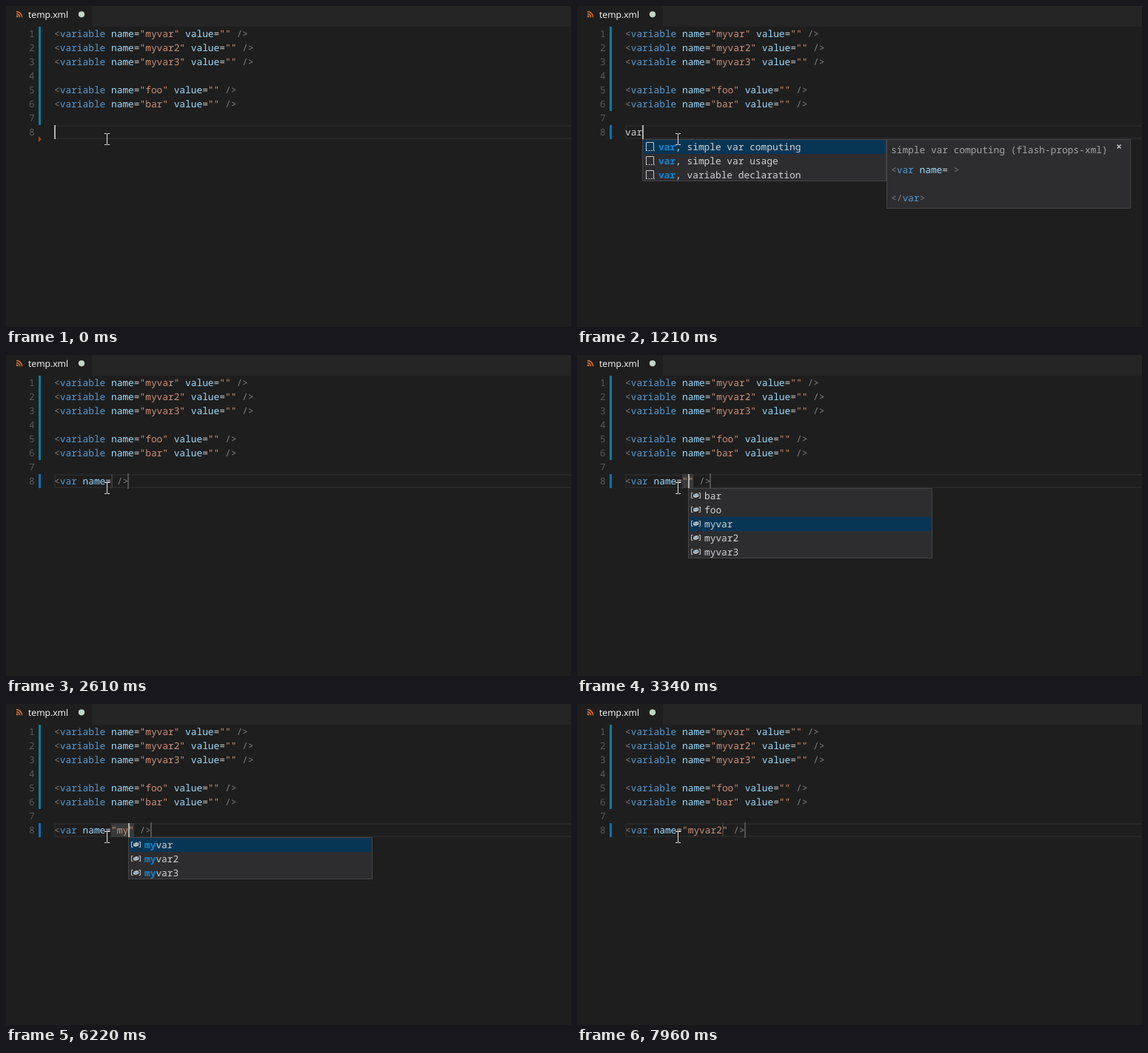
Animation of 763x434 px, one loop 8 s. Source, as an HTML page:

```html
<!DOCTYPE html>
<html lang="en">
<head>
<meta charset="utf-8">
<title>XML snippets</title>
<style>
  html, body { margin: 0; width: 100%; height: 100%; overflow: hidden; background: #1e1e1e; }
  svg { display: block; width: 763px; height: 434px; }
  text {
    font: 12.83px "Noto Sans Mono", "DejaVu Sans Mono", monospace;
    fill: #d4d4d4;
    white-space: pre;
    text-rendering: geometricPrecision;
  }
  .tab { font: 12.2px "Open Sans", "Noto Sans", sans-serif; fill: #fff; }
  .num { fill: #5a5a5a; }
  .punct { fill: #808080; }
  .tag { fill: #569cd6; }
  .attr { fill: #9cdcfe; }
  .str { fill: #ce9178; }
  .hit { fill: #0e85d4; font-weight: 700; }
  .note { fill: #a4a4a4; }
  .panel { fill: #2d2d30; stroke: #454545; }
  .line { fill: none; stroke: #c5c5c5; }
</style>
</head>
<body>
<svg viewBox="0 0 763 434">
  <rect width="763" height="434" fill="#1e1e1e"/>
  <rect x="116" width="647" height="28" fill="#252526"/>
  <g fill="none" stroke="#cc6d33" stroke-width="1.7">
    <path d="M14 10.6a4.6 4.6 0 0 1 4.6 4.6M14 7.6a7.6 7.6 0 0 1 7.6 7.6"/>
    <circle cx="15.2" cy="14" r=".6"/>
  </g>
  <text class="tab" x="30" y="15.5">temp.xml</text>
  <circle cx="102" cy="11.3" r="4.1" fill="#c4d4c8"/>
  <rect x="66" y="162" width="720" height="17" fill="none" stroke="#282828" stroke-width="2"/>
  <g id="page"></g>
  <g id="live"></g>
  <path d="M133 172.5h3M137 172.5h3M136.5 173v14M133 187.5h3M137 187.5h3" fill="none" stroke="#e8e8e8"/>
</svg>
<script>
const LOOP = 8000, LEFT = 65, ROW = 19, CHAR = 7.698;
const page = document.getElementById('page');
const live = document.getElementById('live');

const colX = n => Math.round(LEFT + n * CHAR);
const rowY = n => 28 + n * ROW;
const esc = s => s.replace(/</g, '&lt;').replace(/>/g, '&gt;');
const span = (cls, s) => `<tspan class="${cls}">${esc(s)}</tspan>`;
const text = (x, y, body, cls = '') => `<text class="${cls}" x="${x}" y="${y}">${body}</text>`;
const rect = (x, y, w, h, fill) => `<rect x="${x}" y="${y}" width="${w}" height="${h}" fill="${fill}"/>`;
const panel = (x, y, w, h) =>
  `<rect class="panel" x="${x + .5}" y="${y + .5}" width="${w - 1}" height="${h - 1}"/>`;

// Colours one line of XML; anything else stays plain.
function xml(s) {
  if (s[0] !== '<') return esc(s);
  return s.replace(/"[^"]*"|<\/?\w+|\/?>|\w+/g, m => {
    if (m[0] === '"') return span('str', m);
    if (m[0] === '<') {
      const name = m.search(/\w/);
      return span('punct', m.slice(0, name)) + span('tag', m.slice(name));
    }
    return span(/\w/.test(m) ? 'attr' : 'punct', m);
  });
}

const variable = name => `<variable name="${name}" value="" />`;
const doc = [variable('myvar'), variable('myvar2'), variable('myvar3'), '', variable('foo'), variable('bar'), '', ''];
page.innerHTML = doc.map((s, i) =>
  text(31, rowY(i) + 14, i + 1, 'num') + text(LEFT, rowY(i) + 14, xml(s))).join('');

const icons = {
  snippet: '<path class="line" d="M.5 11V.5h10V11"/><path class="line" d="M0 11.5h12" stroke-dasharray="2 1.5"/>',
  wrench: '<path class="line" d="M1 11L7 5" stroke-width="3" stroke-linecap="round"/>' +
    '<path class="line" d="M8.5 1a3 3 0 1 0 3 3" stroke-width="2.4"/>',
  value: '<path class="line" d="M1.5 2.5h-2v7h2M9.5 2.5h2v7h-2"/>' +
    '<path d="M2 5l4-2 3.5 1v3l-4 2L2 8z" fill="#c5c5c5"/><path d="M3 5.5l2.5 1L9 4.6" fill="none" stroke="#3f86b5"/>'
};

const snippets = ['var, simple var computing', 'var, simple var usage', 'var, variable declaration'];
const tags = [...snippets, 'video'];
const help = [
  ['simple var computing', '<var name= >', '', '</var>'],
  ['simple var usage', '<var name= />']
];
const mine = ['myvar', 'myvar2', 'myvar3'];
const values = ['bar', 'foo', ...mine];

function details(x, [title, ...lines]) {
  return panel(x, 180, 330, 38 + lines.length * ROW - (lines.length > 1 ? 1 : 0)) +
    text(x + 6, 199, `${title} (flash-props-xml)`, 'note') +
    lines.map((s, i) => text(x + 6, 226 + i * 18.8, xml(s))).join('') +
    `<path class="line" d="M${x + 311.5} 187.5l5 5m0-5l-5 5" stroke-width="1.5"/>`;
}

function popup({ list, sel, hit, col }) {
  const x = colX(col), isTag = list[0].startsWith('var');
  let out = panel(x, 180, 330, list.length * ROW);
  list.forEach((s, i) => {
    const y = 181 + i * ROW;
    const icon = isTag ? (s === 'video' ? 'wrench' : 'snippet') : 'value';
    if (i === sel) out += rect(x + 1, y, 328, Math.min(ROW, 179 + list.length * ROW - y), '#073655');
    out += `<g transform="translate(${x + 5} ${y + 3})">${icons[icon]}</g>` +
      text(x + 22, y + 14, span('hit', s.slice(0, hit)) + s.slice(hit));
  });
  return out + (isTag ? details(x + 330, help[sel]) : '');
}

function gutter(edited) {
  return rect(44, 28, 3, (edited ? 6 : 7) * ROW, '#0c7d9d') +
    (edited ? rect(44, 161, 3, ROW, '#0f6faf') : '<path d="M44 176l4 4-4 4z" fill="#a8431f"/>');
}

function draw(s) {
  const y = rowY(7);
  let out = gutter(s.edited);
  if (s.stop) {
    const [from, to] = s.stop;
    out += rect(colX(from), y, Math.max(2, colX(to) - colX(from)), ROW, '#3a3a3a') +
      rect(colX(s.line.length) - 1, y - 1, 2, ROW + 2, '#525252');
  }
  out += text(LEFT, y + 14, xml(s.line));
  if (s.wave) out += '<path d="M150 178.5l2-2 3 3 3-3 3 3 3-3 1 1" fill="none" stroke="#e0433c"/>';
  if (s.caret) out += rect(colX(s.col), y, 2, ROW, '#aeafad');
  return out + (s.list ? popup(s) : '');
}

const on = { caret: true }, off = { caret: false };
const type = (line, col, more) => ({ line, col, ...on, ...more });

// Each step changes only what it names.
const steps = [
  [0, type('', 0, { edited: false })],
  [210, off],
  [600, on],
  [820, type('v', 1, { list: tags, sel: 0, hit: 1 })],
  [1090, type('va', 2, { list: snippets, hit: 2, edited: true })],
  [1210, type('var', 3, { hit: 3 })],
  [1460, { sel: 1 }],
  [1600, off],
  [2220, type('<var name= />', 10, { list: null, stop: [10, 10] })],
  [2610, off],
  [3340, type('<var name="" />', 11, { list: values, sel: 2, hit: 0, stop: [10, 12] })],
  [3720, off],
  [4220, on],
  [4600, { sel: 3 }],
  [4720, off],
  [5220, on],
  [5740, off],
  [6090, type('<var name="m" />', 12, { list: mine, sel: 0, hit: 1, stop: [10, 13] })],
  [6210, type('<var name="my" />', 13, { hit: 2, stop: [10, 14] })],
  [6340, { wave: true }],
  [6590, off],
  [6970, { sel: 1 }],
  [7080, on],
  [7580, type('<var name="myvar2" />', 17, { list: null, wave: false, stop: [17, 17] })],
  [7960, off]
];

let state = {};
const scenes = steps.map(([at, change]) => {
  state = { ...state, ...change };
  return { at, svg: draw(state) };
});

let shown;
function tick() {
  const t = performance.now() % LOOP;
  const scene = scenes.findLast(s => s.at <= t);
  if (scene !== shown) live.innerHTML = (shown = scene).svg;
  requestAnimationFrame(tick);
}
tick();
</script>
</body>
</html>
```
